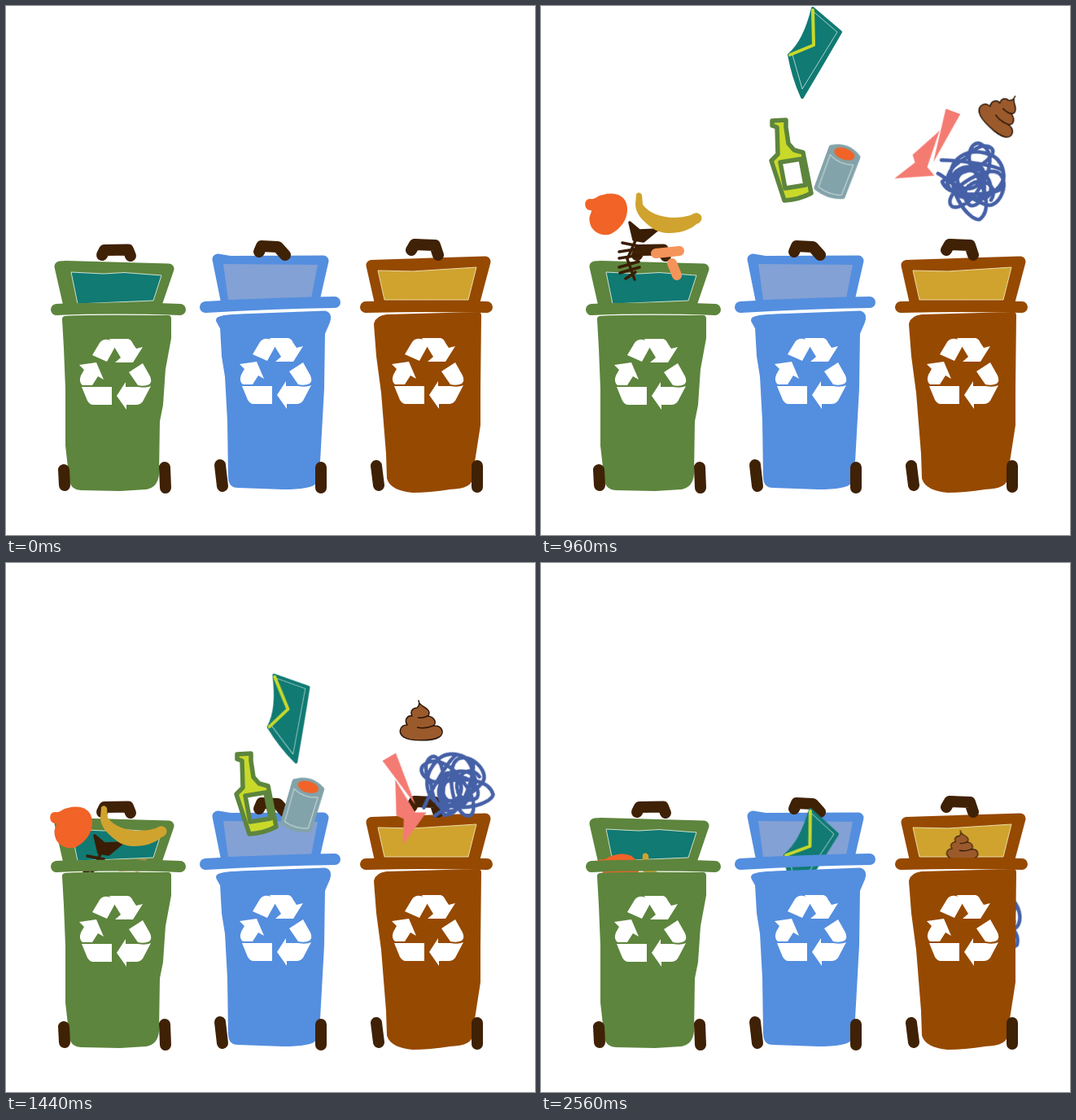
These frames come from a looping animation (650 px wide and 650 px high, 2.76 s). An HTML page without scripts:

```html
<!DOCTYPE html>
<html lang="en">
<head>
<meta charset="utf-8">
<title>Sorting waste into three bins</title>
<style>
  html, body { margin: 0; width: 100%; height: 100%; overflow: hidden; background: #fff; }
  svg { display: block; width: 100%; height: 100%; }

  .green { --bin: #5d853d; }
  .blue { --bin: #548edf; }
  .brown { --bin: #964900; }
  .lid, .body, .lip { stroke: var(--bin); stroke-linecap: round; stroke-linejoin: round; }
  .lid, .body { fill: var(--bin); }
  .lid { stroke-width: 13; }
  .lip { fill: none; stroke-width: 14; }
  .body { stroke-width: 8; }
  .dark { fill: none; stroke: #3f2105; stroke-width: 14; stroke-linecap: round; stroke-linejoin: round; }
  .line { fill: none; stroke-linecap: round; stroke-linejoin: round; }

  /* Each item holds one pose per step; a missing pose hides it. */
  .item {
    --p1: scale(0); --p2: scale(0); --p3: scale(0); --p4: scale(0); --p5: scale(0);
    transform: scale(0);
    transform-origin: 0 0;
    animation: pose 2.76s step-end infinite;
  }
  @keyframes pose {
    0% { transform: scale(0); }
    17.391% { transform: var(--p1); }
    34.783% { transform: var(--p2); }
    52.174% { transform: var(--p3); }
    69.565% { transform: var(--p4); }
    92.754%, 100% { transform: var(--p5); }
  }

  .food { --p1: none; --p2: translateY(70px); --p3: translateY(139px); }
  .peel { --p4: translate(14px, 197px); --p5: translate(14px, 197px); }
  .banana { --p4: translate(8px, 197px); --p5: translate(8px, 197px); }
  .shards {
    --p1: translate(490px, 131px);
    --p2: translate(482px, 192px) rotate(20deg);
    --p3: translate(503px, 297px) rotate(-30deg);
  }
  .yarn {
    --p1: translate(543px, 137px);
    --p2: translate(529px, 215px) rotate(18deg);
    --p3: translate(551px, 276px) rotate(-50deg);
    --p4: translate(547px, 353px) rotate(-50deg);
    --p5: translate(548px, 438px) rotate(-20deg);
  }
  .poop {
    --p1: translate(550px, 45px) rotate(25deg);
    --p2: translate(567px, 132px) rotate(43deg);
    --p3: translate(510px, 195px);
    --p4: translate(476px, 310px) rotate(-25deg) scale(.85);
    --p5: translate(517.5px, 348px) scale(.74);
  }
  .letter {
    --p2: translate(334px, 2px);
    --p3: translate(329px, 137px) rotate(-21deg);
    --p4: translate(313px, 212px) rotate(42deg);
    --p5: translate(331px, 302px) rotate(2deg);
  }
  .can {
    --p2: translate(364px, 203px) rotate(20deg);
    --p3: translate(364px, 297px) rotate(16deg);
    --p4: translate(357px, 345px) rotate(45deg) scale(1.05);
  }
  .bottle { --p2: none; --p3: translateY(94px); --p4: translate(1px, 151px); }
</style>
</head>
<body>
<svg viewBox="0 0 650 650" role="img" aria-label="Waste falling into recycling bins">
  <defs>
    <g id="loop" fill="#fff">
      <path d="M106 429L115 414Q119 409 125 410Q132 411 135 417L124 437Z"/>
      <path d="M127 409H150Q154 410 156 415L160 421L168 419L156 438L134 438L141 432Z"/>
      <path d="M151 450L168 439L177 455Q180 462 176 465Q170 468 162 466Z"/>
      <path d="M178 467L168 486Q165 490 160 490H148V496L136 479L147 462V468H162Q172 470 178 467Z"/>
      <path d="M93 468H130V490H107Q103 490 100 485Z"/>
      <path d="M90 441L111 438L120 459L113 455L106 466H94Q89 462 92 454L96 447Z"/>
    </g>
    <clipPath id="mouth"><path d="M0 0H650V381H0Z"/></clipPath>
  </defs>

  <!-- Open lids -->
  <g class="green">
    <path class="lid" d="M66 320L74 319.500L200 323L186 364H76Z"/>
    <path d="M80 327L120 329L145 327.500L191 331L181 362L88 366Z" fill="#107a73" stroke="#cfe0cf"/>
    <path class="dark" d="M118 306L121 300L150 299.500L153 307"/>
  </g>
  <g class="blue">
    <path class="lid" d="M260 311L275 313.500L390 313L379 361H270Z"/>
    <path d="M267 317L383 318L375 359L273 361Z" fill="#83a1d4"/>
    <path class="dark" d="M311 302L314 295L334 296L343 306"/>
  </g>
  <g class="brown">
    <path class="lid" d="M449 318.500L589 314L576 363H459Z"/>
    <path d="M457 325L500 326L578 321L568 361H465Z" fill="#d0a32e" stroke="#eadba5"/>
    <path class="dark" d="M498 300L502 293L527 294L531 306"/>
  </g>

  <!-- Food scraps -->
  <g clip-path="url(#mouth)">
    <g class="item food line" stroke="#3a1d05" stroke-width="3.500">
      <path fill="#3a1d05" d="M109 196L121 206L143 205L126 219L114 217Z"/>
      <path d="M117 216L106 241L115 266M100 221L120 225M96 232L121 228M96 240L121 236M96 251L120 244M97 258L121 251M104 265L116 257"/>
    </g>
    <path class="item food line" stroke="#f5945a" stroke-width="12" d="M141 234L170 231M161 246L167 261"/>
    <path class="item food peel" fill="#f16327" d="M76 162C90 158 105 162 106 178C107 192 98 204 86 210C76 214 62 208 60 196C58 188 62 186 62 181C52 182 52 167 60 167C68 168 68 163 76 162Z"/>
    <path class="item food banana" fill="#d0a32e" d="M117 161Q121 157 124 162L125 174C135 188 160 194 184 187Q192 181 197 188Q199 195 191 198C178 210 150 213 137 203C124 194 116 184 116 174Z"/>
  </g>

  <!-- Recyclables -->
  <g class="item can">
    <path fill="#82a3a9" stroke="#82a3a9" stroke-width="6" stroke-linejoin="round" d="M-17 -25Q0 -36 18 -25L17 27Q0 34 -17 28Z"/>
    <path class="line" stroke="#cfdfe2" d="M-15 -16L-15 26Q0 31 15 26L16 -14Q0 -8 -15 -16"/>
    <ellipse cx="1" cy="-23" rx="13" ry="7" fill="#f16327"/>
  </g>
  <!-- The label is a hole -->
  <path class="item bottle" fill="#c8d92a" fill-rule="evenodd" stroke="#5d853d" stroke-width="5.500" stroke-linejoin="round"
    d="M284 141L301 140L301 149L304 169L311 177L322 180L332 230Q317 238 299 239L283 190L291 182L290 149L284 147ZM294 192L319 188L325 220L300 224Z"/>
  <g class="item letter">
    <path fill="#107a73" stroke="#107a73" stroke-width="4" stroke-linejoin="round" d="M0 1L34 30Q12 68 -13 110Q-24 86 -29 58Q-10 42 0 1Z"/>
    <path class="line" stroke="#a9d3cc" d="M2 6L30 30L-13 100L-25 58"/>
    <path class="line" stroke="#c8d92a" stroke-width="4" d="M0 3L1 46L-28 58"/>
  </g>

  <!-- Other waste -->
  <path class="item shards" fill="#f47b72" d="M-8 -67H11L0 0ZM-6 -39L-27 0L-21 8L-38 35L7 15L-5 8Z"/>
  <path class="item yarn line" stroke="#4560a6" stroke-width="4.500" d="M-43 -13C-20 -20 30 -30 34 -22C44 -5 20 25 -10 22C-35 18 -35 -5 -15 -25C-5 -52 15 -50 14 -40C10 -15 -30 0 -34 12C-20 30 25 10 36 0C42 -15 30 -38 10 -38C-20 -38 -35 -15 -25 5C-10 20 20 25 26 10C30 -10 -5 -30 -22 -5C-30 15 10 48 24 42C36 25 15 0 0 -12C-15 -20 -18 -45 -5 -47C15 -45 20 -20 12 5C8 30 -15 48 -18 30C-18 10 10 -20 26 -20C46 -18 44 20 28 22C5 24 -30 5 -42 4M-20 5C-10 -30 20 -25 10 0C0 20 -25 10 -15 -5C0 -25 30 0 15 25C5 38 -10 15 0 5C10 -10 35 -5 30 15"/>
  <g class="item poop" stroke="#2b1608" stroke-width="1.500" stroke-linejoin="round">
    <path fill="#9b5a2c" d="M-3 -26C-3 -18 9 -19 10 -11Q10 -8 8 -7C18 -6 19 3 15 5C27 4 29 15 22 19C14 24 -14 24 -21 19C-29 14 -26 4 -17 4C-21 -2 -17 -8 -11 -7C-14 -13 -10 -17 -5 -17Q-1 -20 -3 -26Z"/>
    <path fill="none" d="M8 -7Q2 -4 -4 -5M15 5Q5 9 -5 7"/>
  </g>

  <!-- Bin fronts -->
  <g class="green">
    <path class="lip" d="M62 373Q130 370 214 373"/>
    <path class="body" d="M73 385Q85 383 199 384L199 408L192 446L189 490L185 510L184 575Q183 588 172 590L140 592L92 591Q84 591 82 584L77 540V470L75 420Z"/>
    <path class="dark" d="M71 570L72 589M195 567L196 592"/>
    <use href="#loop"/>
  </g>
  <g class="blue">
    <path class="lip" d="M245 370Q330 365 404 364"/>
    <path class="body" d="M262 386Q264 383 300 382L392 378.500Q397 380 394 388L388 402L387 470L382 560L378 584Q374 590 340 590L285 588Q277 588 277 578L276 510L273 455L269 430L267 395Z"/>
    <path class="dark" d="M263 564L266 590M387 567V592"/>
    <use href="#loop" x="197" y="-1"/>
  </g>
  <g class="brown">
    <path class="lip" d="M442 370Q520 368 591 370"/>
    <path class="body" d="M456 391Q458 384 468 383L580 380L579 470L579 515L572 560L569 582Q565 590 545 590Q520 594 500 594Q476 592 472 580L471 550L465 475L459 430Z"/>
    <path class="dark" d="M455 565L458 589M579 565V591"/>
    <use href="#loop" x="384" y="-1"/>
  </g>
</svg>
</body>
</html>
```
